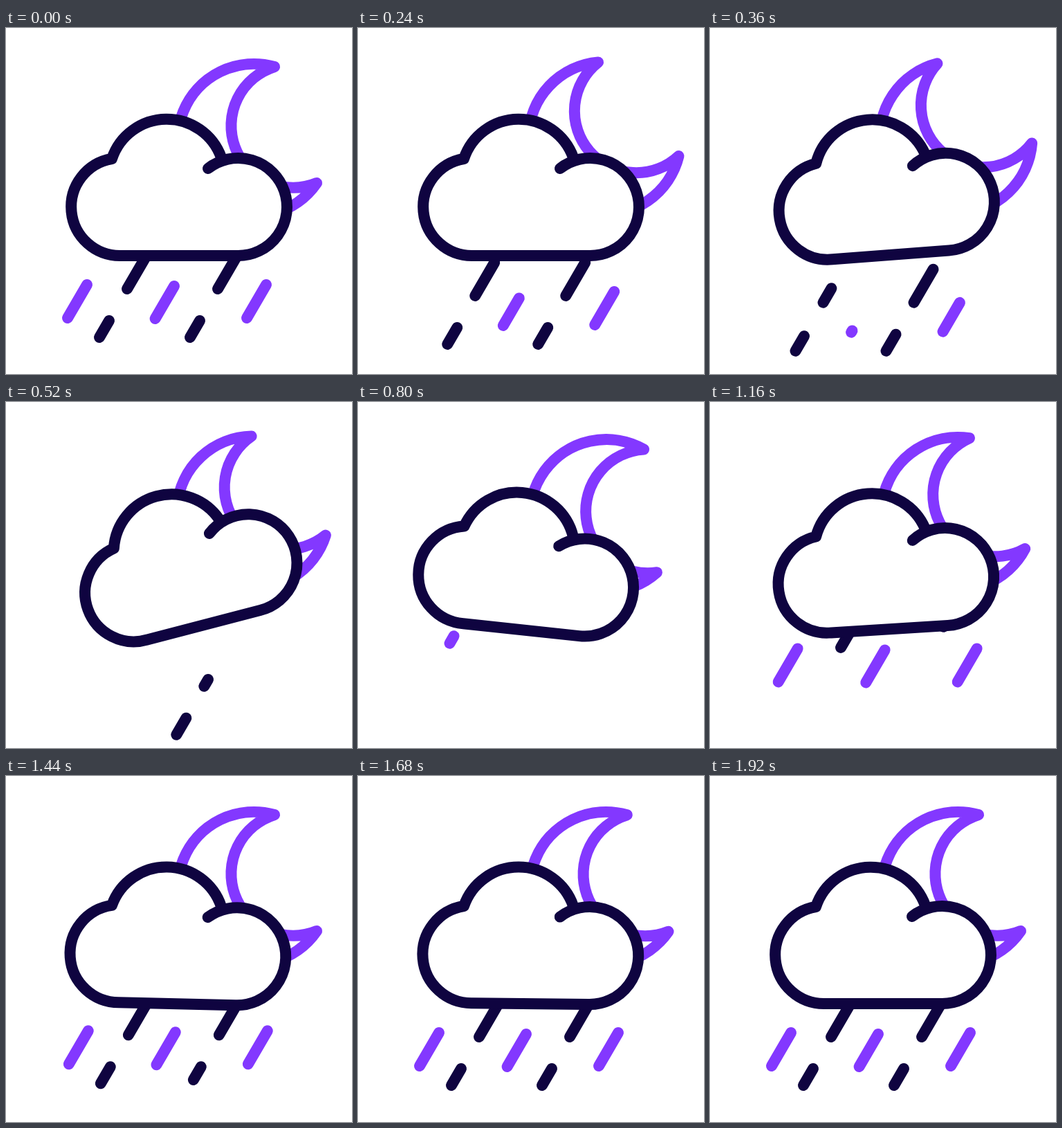
Recreate the animation shown at these times as an HTML page with a canvas. Size 500x500 px, loop 1960 ms.

```html
<!DOCTYPE html>
<html lang="en">
<head>
<meta charset="utf-8">
<title>Rainy night</title>
<style>
  html, body { margin: 0; width: 100%; height: 100%; overflow: hidden; background: #fff; }
  canvas { display: block; }
</style>
</head>
<body>
<canvas id="stage" width="500" height="500"></canvas>
<script>
const ctx = document.getElementById('stage').getContext('2d');
const LOOP = 1960, STEP = 40, TURN = 700;
const DARK = '#0f0440', PURPLE = '#8338ff';

const moon = new Path2D('M388 56A110 110 0 1 0 449 224A89.45 89.45 0 1 1 388 56Z');
const cloud = new Path2D('M292 203A70.5 70.5 0 1 1 335 329H166.5' +
  'A70.5 70.5 0 0 1 153 189A83.6 83.6 0 0 1 311 187');

// Swing keys: [time, degrees]
const moonSwing = [[20, 0], [370, -30], [785, 14], [1140, -6.8], [1440, 0], [1600, 0.5], [1920, 0]];
const cloudSwing = [[260, 0], [540, -14.8], [820, 6.4], [1130, -3.7], [1410, 1.4], [1920, 0]];

// Drops: top x, top y, height, colour, time it shrinks, time it grows
const drops = [
  [117, 371, 48, PURPLE, 30, 740],
  [243, 373, 47, PURPLE, 190, 830],
  [376, 371, 48, PURPLE, 315, 920],
  [203, 329, 48, DARK, 250, 1010],
  [334, 329, 48, DARK, 378, 1100],
  [149, 423, 24, DARK, 340, 1250],
  [280, 423, 24, DARK, 530, 1370]
];

function ease(p) {
  p = Math.min(1, Math.max(0, p));
  return p * p * (3 - 2 * p);
}

function swing(keys, t) {
  let angle = keys[0][1];
  for (let i = 1; i < keys.length; i++) {
    const [t0, a0] = keys[i - 1], [t1, a1] = keys[i];
    angle += (a1 - a0) * ease((t - t0) / (t1 - t0));
  }
  return angle;
}

function drawSwung(path, x, y, degrees, color, fill) {
  ctx.save();
  ctx.translate(x, y);
  ctx.rotate(degrees * Math.PI / 180);
  ctx.translate(-x, -y);
  if (fill) {
    ctx.fillStyle = fill;
    ctx.fill(path);
  }
  ctx.strokeStyle = color;
  ctx.stroke(path);
  ctx.restore();
}

function drawRain(t) {
  const falling = t < TURN;
  const dy = falling ? 50 * ease(t / 840) : -39.7 * ease((1620 - t) / 1120);
  const dx = dy * (falling ? -0.583 : -0.66);
  for (const [x, y, h, color, out, back] of drops) {
    const span = h * 4.17;
    const from = falling ? ease((t - out) / span) : 0;
    const to = falling ? 1 : ease((t - back) / span);
    if (from >= to) continue;
    const point = k => [x + dx - 0.583 * h * k, y + dy + h * k];
    ctx.strokeStyle = color;
    ctx.beginPath();
    ctx.moveTo(...point(from));
    ctx.lineTo(...point(to));
    ctx.stroke();
  }
}

function draw(now) {
  const t = Math.floor(now % LOOP / STEP) * STEP;
  ctx.fillStyle = '#fff';
  ctx.fillRect(0, 0, 500, 500);
  ctx.lineWidth = 16;
  ctx.lineCap = ctx.lineJoin = 'round';
  drawSwung(moon, 349.5, 165, swing(moonSwing, t), PURPLE);
  drawRain(t);
  drawSwung(cloud, 242, 189, swing(cloudSwing, t), DARK, '#fff');
}

const start = performance.now();
function loop() {
  draw(performance.now() - start);
  requestAnimationFrame(loop);
}
loop();
</script>
</body>
</html>
```
